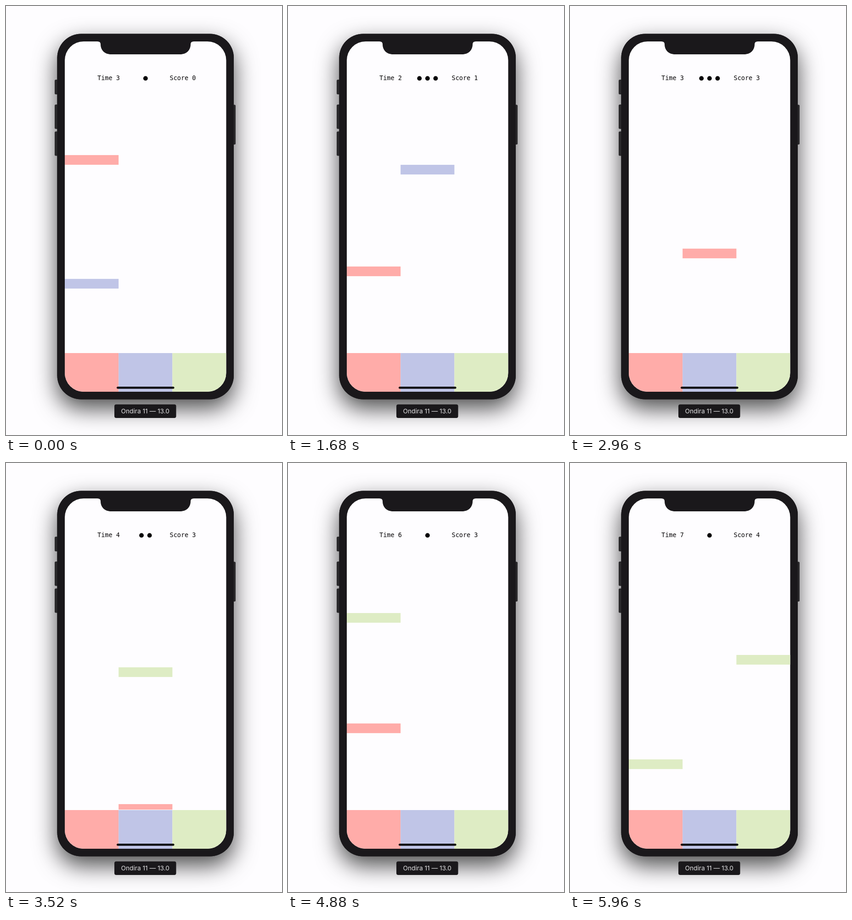
An HTML page with a canvas for the animation above (6000 ms loop, 601 by 932 pixels).

```html
<!DOCTYPE html>
<html lang="en">
<head>
<meta charset="utf-8">
<title>Falling bars</title>
<style>
html, body { margin: 0; width: 100%; height: 100%; overflow: hidden; background: #fefdff; }
canvas { display: block; }
</style>
</head>
<body>
<canvas id="stage" width="601" height="932"></canvas>
<script>
const W = 601, H = 932, LOOP = 6000, STEP = 40;
const RED = '#ffaca9', BLUE = '#c0c5e7', GREEN = '#deecc4';
const BODY = '#1a181b', PAPER = '#fefdff';
const SCREEN = { x: 128, y: 77, w: 351.5, h: 761, r: 41 };
const COL = SCREEN.w / 3, BAR_H = 21, TOP = 265, FLOOR = 753;

// Each bar appears at TOP at its start time (s) and falls at its own speed (px/s).
const bars = [
  { start: -0.970, speed: 338.0, col: 0, color: BLUE },
  { start: -0.161, speed: 365.8, col: 0, color: RED, hit: true },
  { start: 0.691, speed: 304.3, col: 0, color: RED, hit: true },
  { start: 1.430, speed: 320.0, col: 1, color: BLUE, hit: true },
  { start: 2.274, speed: 382.1, col: 1, color: RED },
  { start: 2.978, speed: 330.0, col: 1, color: GREEN },
  { start: 3.839, speed: 289.0, col: 0, color: RED, hit: true },
  { start: 4.673, speed: 294.4, col: 0, color: GREEN },
  { start: 5.485, speed: 320.0, col: 2, color: GREEN }
];
for (const b of bars) b.land = b.start + (FLOOR - BAR_H - TOP) / b.speed;
const restart = bars[0].land;

function rounded(c, x, y, w, h, r, color) {
  c.fillStyle = color;
  c.beginPath();
  c.roundRect(x, y, w, h, r);
  c.fill();
}

function drawNotch(c) {
  const l = 206, r = 402, top = 77, bottom = 105;
  c.fillStyle = BODY;
  c.beginPath();
  c.moveTo(l - 7, top - 1);
  c.lineTo(l - 7, top);
  c.quadraticCurveTo(l, top, l, top + 6);
  c.bezierCurveTo(l, top + 19, l + 9, bottom, l + 23, bottom);
  c.lineTo(r - 23, bottom);
  c.bezierCurveTo(r - 9, bottom, r, top + 19, r, top + 6);
  c.quadraticCurveTo(r, top, r + 7, top);
  c.lineTo(r + 7, top - 1);
  c.fill();
}

function makePhone() {
  const layer = document.createElement('canvas');
  layer.width = W;
  layer.height = H;
  const c = layer.getContext('2d');
  c.fillStyle = PAPER;
  c.fillRect(0, 0, W, H);

  c.save();
  c.shadowColor = 'rgba(0,0,0,0.7)';
  c.shadowBlur = 50;
  c.shadowOffsetY = 20;
  rounded(c, 111.5, 60.5, 384.5, 794, 52, BODY);
  c.restore();

  for (const [y, h] of [[160, 32], [214, 53], [272.5, 53]])
    rounded(c, 106, y, 9, h, 2.5, '#2b2a2c');
  rounded(c, 491, 214.5, 9, 86.5, 2.5, '#2b2a2c');
  rounded(c, 111.5, 60.5, 384.5, 794, 52, BODY);

  const s = SCREEN;
  rounded(c, s.x, s.y, s.w, s.h, s.r, PAPER);
  drawNotch(c);
  c.save();
  c.beginPath();
  c.roundRect(s.x, s.y, s.w, s.h, s.r);
  c.clip();
  [RED, BLUE, GREEN].forEach((color, i) => {
    c.fillStyle = color;
    c.fillRect(s.x + i * COL, 754, COL, 85);
  });
  c.restore();
  rounded(c, 241, 827, 125.5, 4.5, 2.2, '#050305');

  rounded(c, 236, 865.5, 134.5, 29.5, 4, BODY);
  c.fillStyle = '#e4e3e5';
  c.font = '13.7px Inter, Roboto, sans-serif';
  c.textAlign = 'center';
  c.fillText('Ondira 11 — 13.0', 303.2, 885);
  return layer;
}

function gameState(t) {
  const fresh = t >= restart;
  const past = (b, key) => b[key] <= t && b[key] > restart;
  return {
    time: fresh ? bars.filter(b => past(b, 'start')).length : 3,
    score: bars.filter(b => b.hit && past(b, 'land')).length,
    lives: fresh ? 3 - bars.filter(b => !b.hit && past(b, 'land')).length : 1
  };
}

const ctx = document.getElementById('stage').getContext('2d');
const phone = makePhone();

function drawBars(t) {
  for (const b of bars) {
    if (t < b.start) continue;
    const y = TOP + (t - b.start) * b.speed;
    if (y >= FLOOR) continue;
    ctx.fillStyle = b.color;
    ctx.fillRect(SCREEN.x + b.col * COL, y, COL, Math.min(BAR_H, FLOOR - y));
  }
}

function drawHeader(t) {
  const { time, score, lives } = gameState(t);
  ctx.fillStyle = '#050305';
  ctx.font = '13.5px "DejaVu Sans Mono", monospace';
  ctx.fillText('Time ' + time, 199, 161);
  ctx.fillText('Score ' + score, 356.5, 161);
  for (let i = 0; i < lives; i++) {
    ctx.beginPath();
    ctx.arc(303.8 + (i - (lives - 1) / 2) * 17.6, 157.2, 4.9, 0, Math.PI * 2);
    ctx.fill();
  }
}

let origin = null;
function frame(now) {
  if (origin === null) origin = now;
  const t = Math.floor(((now - origin) % LOOP) / STEP) * STEP / 1000;
  ctx.drawImage(phone, 0, 0);
  drawBars(t);
  drawHeader(t);
  requestAnimationFrame(frame);
}
requestAnimationFrame(frame);
</script>
</body>
</html>
```
